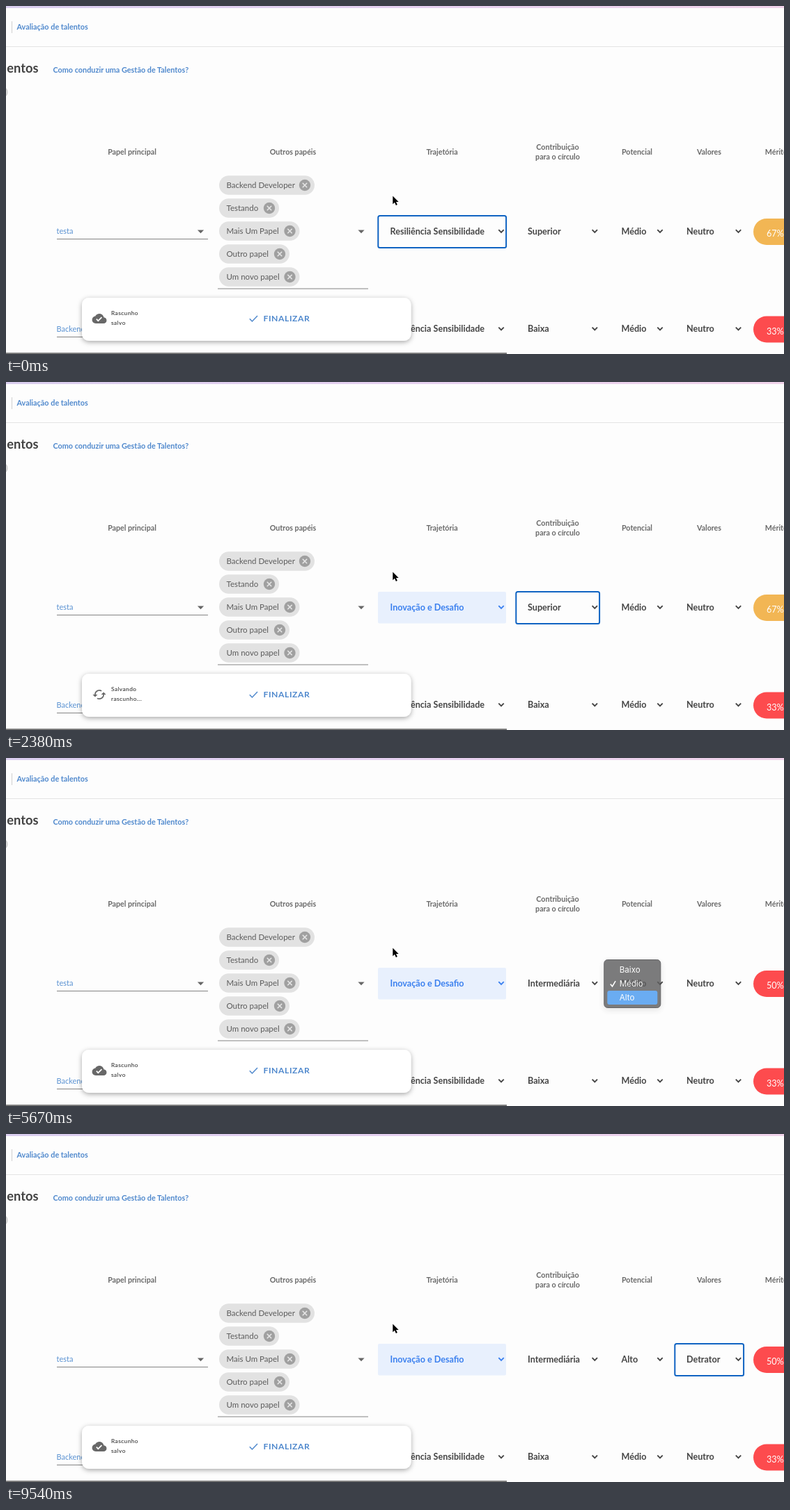
An HTML page for the animation above (9640 ms loop, 1117 px wide and 501 px high).

```html
<!DOCTYPE html>
<html lang="pt">
<head>
<meta charset="utf-8">
<title>Avaliação de talentos</title>
<style>
html, body { margin: 0; width: 100%; height: 100%; overflow: hidden; background: #fdfdfd; }
svg { display: block; }
text { font-family: Lato, "Open Sans", sans-serif; white-space: pre; }
.link { font-size: 10.85px; font-weight: 700; fill: #5089cd; }
.title { font-size: 18.3px; font-weight: 700; fill: #424242; text-anchor: end; }
.head { font-size: 10.7px; font-weight: 700; fill: #696969; text-anchor: middle; }
.chip { font-size: 11.5px; fill: #5c5c5c; }
.field { font-size: 11px; fill: #5a92d2; }
.value { font-size: 12.6px; font-weight: 700; fill: #454545; }
.pill { font-size: 12.6px; fill: #fff; }
.note { font-size: 8.3px; letter-spacing: .45px; fill: #444; stroke: #444; stroke-width: .15px; }
.done { font-size: 12.2px; font-weight: 700; letter-spacing: .55px; fill: #5089cd; }
.item { font-family: Inter, "Liberation Sans", sans-serif; font-size: 11.55px; fill: #fff; }
</style>
</head>
<body>
<svg id="stage" width="1117" height="501" viewBox="0 0 1117 501">
  <defs>
    <linearGradient id="strip">
      <stop offset="0" stop-color="#d9cdee"/>
      <stop offset=".5" stop-color="#e5d0f0"/>
      <stop offset="1" stop-color="#f0d3ea"/>
    </linearGradient>
    <filter id="cardShadow" x="-10%" y="-40%" width="120%" height="190%">
      <feDropShadow dx="0" dy="2" stdDeviation="3.5" flood-opacity=".34"/>
    </filter>
    <filter id="menuShadow" x="-20%" y="-40%" width="140%" height="190%">
      <feDropShadow dx="0" dy="3" stdDeviation="5" flood-opacity=".12"/>
    </filter>
  </defs>
</svg>
<script>
const LOOP = 9640;
const stage = document.getElementById('stage');

function add(tag, attrs, parent = stage) {
  const el = document.createElementNS('http://www.w3.org/2000/svg', tag);
  for (const k in attrs) el.setAttribute(k, attrs[k]);
  parent.appendChild(el);
  return el;
}
function rect(x, y, width, height, fill, rx = 0, parent = stage) {
  return add('rect', { x, y, width, height, fill, rx }, parent);
}
function line(d, stroke, width, parent = stage) {
  return add('path', { d, stroke, 'stroke-width': width, fill: 'none' }, parent);
}
function label(str, x, y, cls, parent = stage) {
  const el = add('text', { x, y, class: cls }, parent);
  el.textContent = str;
  return el;
}
const show = (el, on) => el.setAttribute('visibility', on ? 'visible' : 'hidden');
const caret = x => add('path', { d: `M${x - 4.6} 322.6h9.2l-4.6 4.7z`, fill: '#666' });

// Page header
rect(0, 0, 1117, 3, 'url(#strip)');
rect(0, 58, 1117, 1, '#e4e4e4');
rect(8, 22, 1, 17, '#d0d0d0');
label('Avaliação de talentos', 15.5, 34, 'link');
label('entos', 46.5, 96, 'title');
label('Como conduzir uma Gestão de Talentos?', 67.5, 95.5, 'link');
add('circle', { cx: -6, cy: 124, r: 8, fill: '#e2e2e2', stroke: '#c4c4c4' });

// Column titles
[['Papel principal', 181], ['Outros papéis', 412], ['Trajetória', 626], ['Potencial', 906],
 ['Valores', 1009.5], ['Mérito', 1106]].forEach(([s, x]) => label(s, x, 214, 'head'));
label('Contribuição', 792, 207.3, 'head');
label('para o círculo', 792, 221, 'head');

// Role fields
label('testa', 72.5, 328, 'field');
rect(73, 335, 217, 1, '#848484');
caret(279.5);
label('Backend', 72.5, 468.5, 'field');
rect(73, 476, 217, 1, '#848484');
rect(304, 406.5, 216, 1, '#848484');
caret(510);

[['Backend Developer', 137], ['Testando', 86], ['Mais Um Papel', 115.5], ['Outro papel', 101],
 ['Um novo papel', 115.5]].forEach(([s, w], i) => {
  const y = 258 + i * 33, x = 306 + w - 14;
  rect(306, y - 13.7, w, 27.4, '#e2e2e2', 13.7);
  label(s, 316.5, y + 4, 'chip');
  add('circle', { cx: x, cy: y, r: 8.2, fill: '#a0a0a0' });
  line(`M${x - 3.2} ${y - 3.2}l6.4 6.4m0 -6.4l-6.4 6.4`, '#e6e6e6', 1.6);
});

// Selects of both rows
const fill = rect(534, 302, 184, 45.5, '#e8f0fd', 2);
function select(str, x, arrowX, y) {
  return {
    text: label(str, x, y + 4.7, 'value'),
    arrow: line(`M${arrowX - 3.7} ${y - 1.8}l3.7 3.7l3.7 -3.7`, '#444', 1.9)
  };
}
const columns = [[551.5, 711], [749, 845.3], [883.5, 939], [977, 1051.5]];
const row = (values, y) => values.map((v, i) => select(v, ...columns[i], y));
const first = row(['Resiliência Sensibilidade', 'Superior', 'Médio', 'Neutro'], 324);
row(['Resiliência Sensibilidade', 'Baixa', 'Médio', 'Neutro'], 464.5);

const rings = [[534, 184], [732, 120], [866, 80], [960, 99]].map(([x, w]) =>
  add('rect', { x: x + .3, y: 302, width: w - .2, height: 46, rx: 2.5, fill: 'none',
    stroke: '#0f63c2', 'stroke-width': 2 }));

// Merit pills
const merit = rect(1073, 306, 80, 38, '#f2b654', 19);
const meritText = label('67%', 1092, 332.2, 'pill');
rect(1073, 446.5, 80, 38, '#fd4b4e', 19);
label('33%', 1092, 472.7, 'pill');

rect(0, 499, 719, 2, '#7d7d7d');

// Draft card
add('rect', { x: 109, y: 420, width: 472.5, height: 62, rx: 10, fill: '#fff', filter: 'url(#cardShadow)' });
const icon = d => add('path', { d, fill: '#686868', transform: 'translate(123.6 439.6) scale(.87)' });
const cloud = icon('M19.35 10.04C18.67 6.59 15.64 4 12 4 9.11 4 6.6 5.64 5.35 8.04 2.34 8.36 0 10.91 0 14c0 3.31 2.69 6 6 6h13c2.76 0 5-2.24 5-5 0-2.64-2.05-4.78-4.65-4.96zM10 17l-3.5-3.5 1.41-1.41L10 14.17 15.18 9l1.41 1.41L10 17z');
const sync = icon('M19 8l-4 4h3c0 3.31-2.69 6-6 6-1.01 0-1.97-.25-2.8-.7l-1.46 1.46C8.97 19.54 10.43 20 12 20c4.42 0 8-3.58 8-8h3l-4-4zM6 12c0-3.31 2.69-6 6-6 1.01 0 1.97.25 2.8.7l1.46-1.46C15.03 4.46 13.57 4 12 4c-4.42 0-8 3.58-8 8H1l4 4 4-4H6z');
const notes = [label('', 151, 445, 'note'), label('', 151, 459.3, 'note')];
line('M349.8 450.2l3.6 3.7l7.6 -7.9', '#5089cd', 1.5);
label('FINALIZAR', 369.5, 453.8, 'done');

// Option menus
function menu(x, y, w, items, checked) {
  const g = add('g', {});
  add('rect', { x: x + .5, y: y + .5, width: w - 1, height: items.length * 20 + 9, rx: 5,
    fill: '#5e5f61', stroke: '#434345', filter: 'url(#menuShadow)' }, g);
  const bar = rect(x + 5, 0, w - 10, 20, '#4a9bf0', 3, g);
  items.forEach((s, i) => label(s, x + 22.5, y + 19.2 + i * 20, 'item', g));
  line(`M${x + 9.5} ${y + 15.5 + checked * 20}l2.7 3.3l4.6 -7.6`, '#fff', 1.6, g);
  return { g, bar, y: y + 5 };
}
const menus = [
  menu(526.5, 290, 185.5, ['Inovação e Desafio', 'Resiliência Sensibilidade'], 1),
  menu(724, 270, 122.5, ['Baixa', 'Intermediária', 'Superior'], 2),
  menu(858.3, 290, 82, ['Baixo', 'Médio', 'Alto'], 1),
  menu(952, 290, 101, ['Detrator', 'Neutro', 'Promotor'], 1)
];

// Mouse pointer
add('path', { d: 'M555.3 273.6v11.6l2.7-2.5 1.9 4.2 2-.9-1.9-4.1h3.7z', fill: '#000', stroke: '#fff',
  'stroke-width': .9, 'paint-order': 'stroke' });

// Time, menu opacity; time, highlighted row
const tracks = {
  opacity: [
    [[0, 0], [750, 1], [1650, .62], [1790, 0]],
    [[0, 0], [2830, 1], [3730, .7], [3880, 0]],
    [[0, 0], [4930, 1], [5670, .82], [5820, 0]],
    [[0, 0], [7170, 1], [8500, .7], [8650, 0]]
  ],
  active: [
    [[0, 1], [1200, 0]],
    [[0, 2], [3430, 1]],
    [[0, 1], [5230, 2]],
    [[0, 1], [8060, 0]]
  ],
  value: [
    [[0, 'Resiliência Sensibilidade'], [1790, 'Inovação e Desafio']],
    [[0, 'Superior'], [3880, 'Intermediária']],
    [[0, 'Médio'], [5820, 'Alto']],
    [[0, 'Neutro'], [8650, 'Detrator']]
  ],
  ring: [[0, 0], [750, -1], [1790, 0], [2380, 1], [3130, -1], [3880, 1], [4480, 2],
    [4930, -1], [6570, 3], [7310, -1], [8650, 3]],
  merit: [[0, 67], [4030, 50], [6570, 67], [8940, 50]],
  saving: [[0, 0], [2090, 1], [2830, 0], [4480, 1], [5530, 0], [6570, 1], [7460, 0], [8940, 1], [9540, 0]]
};
function at(track, t) {
  let v = track[0][1];
  for (const [start, next] of track) if (t >= start) v = next;
  return v;
}

function draw(t) {
  menus.forEach((m, i) => {
    const o = at(tracks.opacity[i], t);
    show(m.g, o > 0);
    m.g.setAttribute('opacity', o);
    m.bar.setAttribute('y', m.y + 20 * at(tracks.active[i], t));
    first[i].text.textContent = at(tracks.value[i], t);
  });
  menus[3].bar.setAttribute('fill', t < 7310 ? '#77787b' : '#4a9bf0');

  const chosen = t >= 1790;
  show(fill, chosen);
  first[0].text.style.fill = chosen ? '#3b80ef' : '';
  first[0].arrow.setAttribute('stroke', chosen ? '#3b80ef' : '#444');

  const ring = at(tracks.ring, t);
  rings.forEach((r, i) => show(r, i === ring));

  const score = at(tracks.merit, t);
  merit.setAttribute('fill', score > 50 ? '#f2b654' : '#fd4b4e');
  meritText.textContent = score + '%';

  const saving = at(tracks.saving, t);
  show(cloud, !saving);
  show(sync, saving);
  notes[0].textContent = saving ? 'Salvando' : 'Rascunho';
  notes[1].textContent = saving ? 'rascunho...' : 'salvo';
}

const begin = performance.now();
function tick() {
  draw((performance.now() - begin) % LOOP);
  requestAnimationFrame(tick);
}
tick();
</script>
</body>
</html>
```
